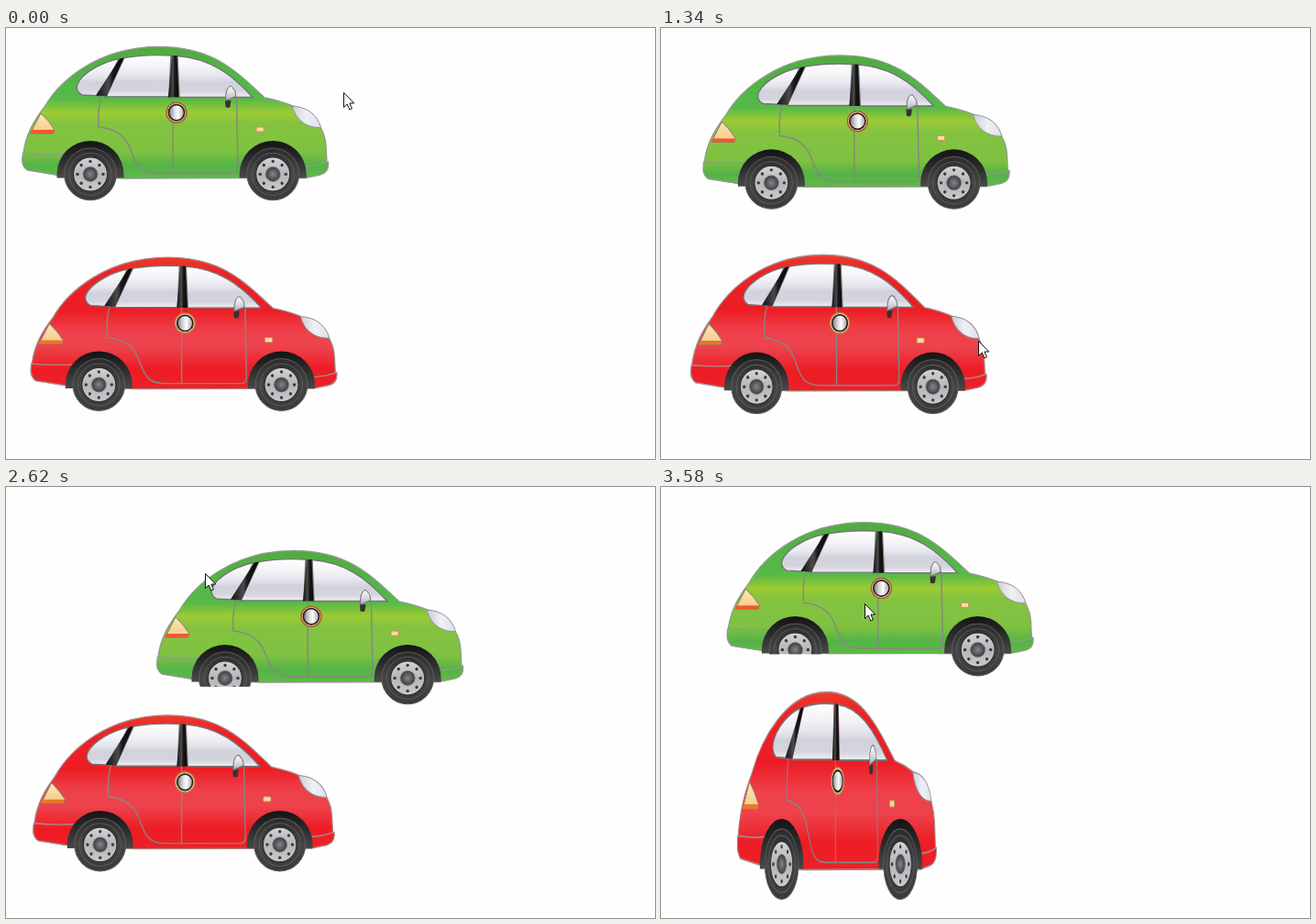
Animation of 708 by 470 pixels, one loop 3.66 s. Source, as an HTML page:

```html
<!DOCTYPE html>
<html lang="en">
<head>
<meta charset="utf-8">
<title>Two cars on hover</title>
<style>
  html, body { margin: 0; width: 100%; height: 100%; overflow: hidden; background: #fefefe; }
  svg { display: block; width: 708px; height: 470px; }
</style>
</head>
<body>
<svg id="stage" viewBox="0 0 708 470" xmlns="http://www.w3.org/2000/svg"></svg>
<script>
const LOOP = 3660;
const STEP = LOOP / 49;   // the picture advances in even steps
const LEAD = 8;
const stage = document.getElementById('stage');

const across = 'x2="1" y2="0"';
const down = 'x2="0" y2="1"';
const bodyAxis = 'gradientUnits="userSpaceOnUse" x1="0" y1="20" x2="0" y2="164"';

// Stops are written as "color offset", the offset being optional at both ends.
function gradient(id, axis, ...stops) {
  const list = stops.map((stop, i) => {
    const [color, at = i / (stops.length - 1)] = stop.split(' ');
    return `<stop offset="${at}" stop-color="${color}"/>`;
  });
  return `<linearGradient id="${id}" ${axis}>${list.join('')}</linearGradient>`;
}

const bolts = Array.from({ length: 8 }, (_, i) =>
  `<circle cx="14" r="1.7" transform="rotate(${i * 45})"/>`).join('');

const defs = `<defs>
  ${gradient('green', bodyAxis, '#50ab3e', '#52b848 .3', '#58b946 .4', '#9ccb33 .5', '#84c340 .58',
    '#7ec141 .8', '#55b347 .9', '#5fb947')}
  ${gradient('red', bodyAxis, '#ee3a28', '#ed2227 .12', '#ed1c24 .4', '#ee404a .56', '#ed434c .68', '#ed1c24 .85', '#ee2028')}
  ${gradient('glass', down, '#fff', '#f3f3f7 .28', '#e4e4ec .5', '#d2d2dc .64', '#d4d4dd .85', '#eeeef3')}
  ${gradient('pillar', across, '#111', '#4b4b4b .45', '#1a1a1a .6', '#050505')}
  ${gradient('knob', across, '#77787b', '#d4d5d8 .35', '#fff .6', '#9c9da2')}
  ${gradient('chrome', down, '#f8f8fa', '#dcdde2', '#a9abb0')}
  ${gradient('lamp', across, '#c9cdd6', '#f0f1f5', '#dcdfe8')}
  ${gradient('tail', down, '#fce7ba', '#f6c884')}
  ${gradient('arch', down, '#141414', '#2c2c2c', '#494949')}
  ${gradient('tire', down, '#2b2b2b', '#454545', '#3a3a3a')}
  ${gradient('rim', down, '#d2d3d5', '#b4b6b9', '#c9cacc')}
  <radialGradient id="hub"><stop stop-color="#858688"/><stop offset="1" stop-color="#3d3d3f"/></radialGradient>
  <g id="wheel">
    <path d="M-36.5 4V0A36.5 36.5 0 0 1 36.5 0V4Z" fill="url(#arch)"/>
    <circle r="28.4" fill="url(#tire)" stroke="#5d5d5d"/>
    <circle r="23" fill="none" stroke="#5a5a5a"/>
    <circle r="18.6" fill="url(#rim)" stroke="#2c2c2c" stroke-width="1.2"/>
    <g fill="#3a3a3c">${bolts}</g>
    <circle r="8" fill="url(#hub)" stroke="#77787a" stroke-width=".7"/>
  </g>
</defs>`;

const car = (paint, edge, strip, ring) => `
  <g fill="url(#${paint})" stroke="${edge}" stroke-width="1.3">
    <path d="M19 136C22 115 30 102 42 86C58 58 100 20.5 167 20.5C225 20.5 250 46 282 76
      C312 82 347 95 349 128L350 146L326 163.5L130 164L58 160.5L24 155Q17 150 18 144Z"/>
    <path d="M63 137.5Q40 138.5 18.5 136.5Q16 150 23 155L58 160.5M326 151Q341 150 351.5 146Q353 157 343 160L326 163.5"/>
  </g>
  <g fill="none" stroke="#858783" stroke-width="1.4">
    <path d="M104 74Q100 85 101 108C120 110 131 117 137 136C143 152 148 158 164 158H248Q253 158 253 152L251.5 76"/>
    <path d="M182.3 75V158"/>
  </g>
  <g fill="url(#glass)" stroke="#747476" stroke-width="1.4">
    <path d="M83 73Q75 69 78 61C84 48 106 37 123 33.5L104 74Z"/>
    <path d="M129 32.5Q152 28.5 180 30L178 75H109Z"/>
    <path d="M187 30.5C222 33 246 50 269 75.5H189Z"/>
  </g>
  <g fill="url(#pillar)">
    <path d="M124 33.5L128.5 32.5L110 74.5L98 73.5Z"/>
    <path d="M181 30H186.5L188.5 75.5H177Z"/>
  </g>
  <path d="M239 79H245.5L244.5 86Q242 88 239.5 86Z" fill="#333"/>
  <path d="M239.5 79.5L240 71Q242 62.5 246 63.5Q251 68 251 74.5Z" fill="url(#chrome)" stroke="#6c6d70"/>
  <circle cx="186" cy="92.3" r="10.9" fill="#f2dcb8" stroke="${ring}" stroke-width="1.4"/>
  <circle cx="186" cy="92.3" r="8.6" fill="url(#knob)" stroke="#2c2020" stroke-width="1.7"/>
  <rect x="273" y="108" width="8.3" height="5.2" rx="1" fill="#fbdc9e" stroke="#c58a5a"/>
  <path d="M312 85C329 86 340 95 343.5 108.5C332 109 317 104 312 85Z" fill="url(#lamp)" stroke="#8d9096"/>
  <path d="M38 93Q47 101 53 111L51.5 115H26.5Z" fill="url(#tail)" stroke="#8b7862"/>
  <path d="M28 111H52.5L51.5 115H26.5Z" fill="${strip}"/>
  <use href="#wheel" x="92" y="159.4"/>
  <use href="#wheel" x="291.2" y="159.4"/>`;

stage.innerHTML = defs + `
  <rect width="708" height="470" fill="#fefefe"/>
  <g id="redCar">
    <rect x="11" y="219.5" width="354" height="212" fill="#fefefe"/>
    <g transform="translate(9.3 229.6)">${car('red', '#a58a88', '#e9772b', '#c9803c')}</g>
  </g>
  <g id="greenCar">
    <rect x="1" width="354" height="216" fill="#fefefe"/>
    ${car('green', '#8d9c8b', '#ee5a30', '#b0552f')}
  </g>
  <path id="cursor" d="M.5 .5V16.5L4.2 13L6.8 19L9.4 17.9L6.9 12H11.7Z" fill="#fff" stroke="#111"/>`;

const [redCar, greenCar, cursor] = ['redCar', 'greenCar', 'cursor'].map(id => document.getElementById(id));

// CSS "ease": cubic-bezier(.25, .1, .25, 1)
function ease(x) {
  if (x <= 0) return 0;
  if (x >= 1) return 1;
  const bez = (a, b, u) => 3 * a * u * (1 - u) ** 2 + 3 * b * u * u * (1 - u) + u ** 3;
  let lo = 0, hi = 1;
  for (let i = 0; i < 24; i++) {
    const mid = (lo + hi) / 2;
    if (bez(.25, .25, mid) < x) lo = mid; else hi = mid;
  }
  return bez(.1, 1, lo);
}

// Times at which the pointer enters and leaves, by turns.
const greenHover = [21, 750, 2326, 2830, 3452];
const redHover = [1263, 1915, 2877, 3452];

// One-second transition; turning back midway shortens it by the distance left.
function transition(flips, t) {
  let value = 0;
  flips.forEach((start, i) => {
    const goal = 1 - i % 2;
    const spent = Math.min(t, flips[i + 1] ?? LOOP) - start;
    const span = Math.abs(goal - value) * 1000;
    if (spent > 0 && span) value += (goal - value) * ease(spent / span);
  });
  return value;
}

// Turning points of the pointer: step, x, y
const pointer = [
  [0, 368, 70], [4, 215, 48], [7, 205, 47], [11, 633, 290], [13, 575, 340], [16, 572, 337], [17, 364, 342],
  [22, 275, 338], [25, 350, 305], [28, 641, 200], [31, 560, 160], [35, 217, 94], [41, 215, 335], [48, 222, 127]
];

function pointerAt(step) {
  const next = Math.max(1, pointer.findIndex(p => p[0] >= step));
  const [[s0, x0, y0], [s1, x1, y1]] = [pointer[next - 1], pointer[next]];
  const u = (step - s0) / (s1 - s0);
  return `${Math.round(x0 + (x1 - x0) * u)} ${Math.round(y0 + (y1 - y0) * u)}`;
}

function draw(time) {
  const step = Math.min(48, Math.floor((time + LEAD) / STEP));
  const t = step * STEP;
  const slide = 100 * transition(greenHover, t);
  const squash = transition(redHover, t) / 2;
  greenCar.setAttribute('transform', `translate(${3 * slide} ${slide})`);
  redCar.setAttribute('transform',
    `translate(188 325.5) scale(${1 - squash} ${1 + squash}) translate(-188 -325.5)`);
  // The car hovered last in its own transition lies on top.
  const [under, over] = t < redHover[0] ? [redCar, greenCar] : [greenCar, redCar];
  if (under.nextElementSibling !== over) stage.insertBefore(under, over);
  cursor.setAttribute('transform', `translate(${pointerAt(step)})`);
}

const begin = performance.now();
function loop() {
  draw((performance.now() - begin) % LOOP);
  requestAnimationFrame(loop);
}
draw(0);
requestAnimationFrame(loop);
</script>
</body>
</html>
```
